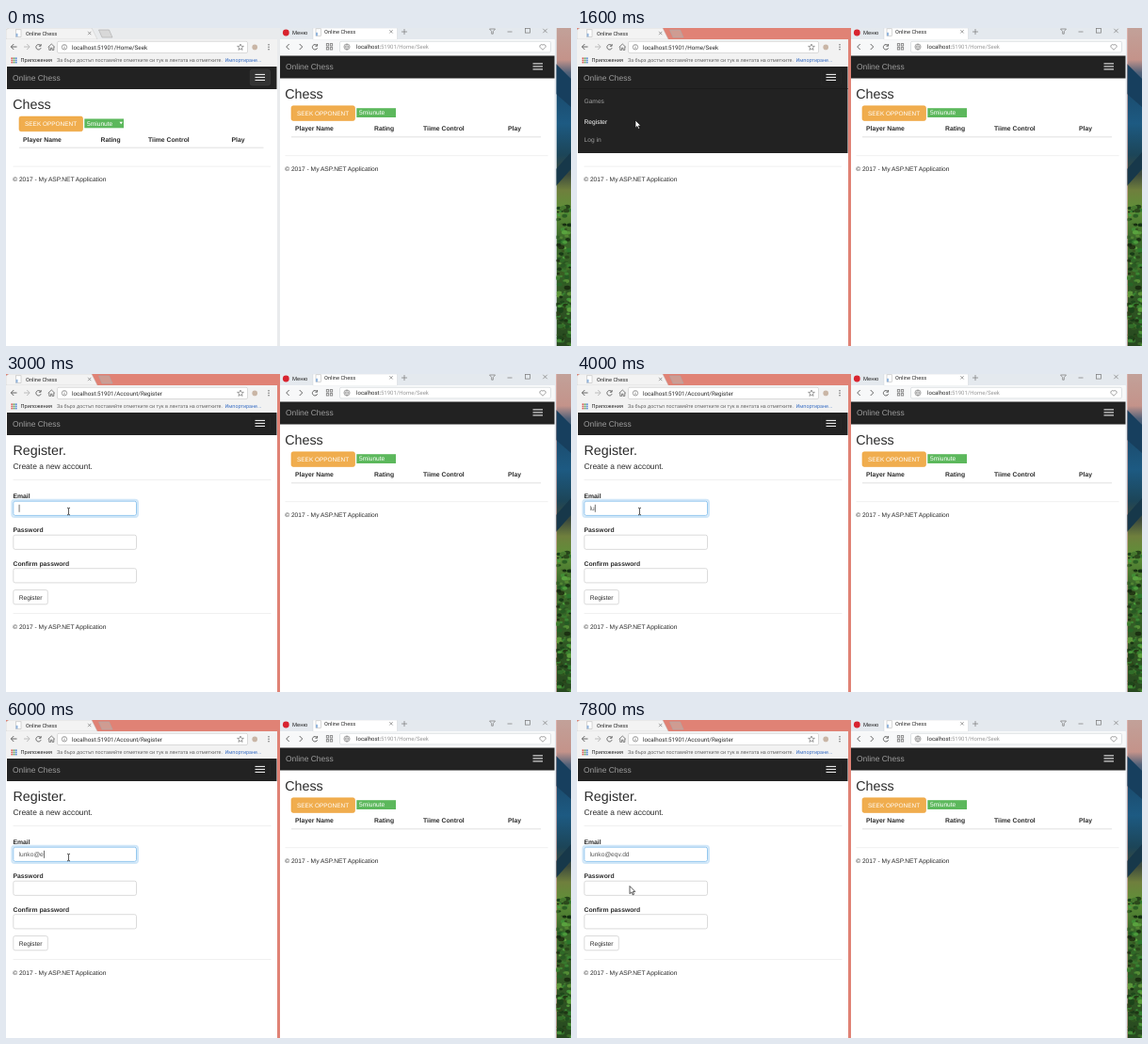
Animation, 600 px wide and 338 px high, one loop 8 s. Source, as an HTML page:

```html
<!DOCTYPE html>
<html lang="en">
<head>
<meta charset="utf-8">
<title>Online Chess</title>
<style>
  html, body { margin: 0; width: 100%; height: 100%; overflow: hidden; background: #fff; }
  svg { display: block; width: 100%; height: 100%; }
  text { font: 6.65px "Liberation Sans", Arial, sans-serif; fill: #2b2b2b; text-rendering: geometricPrecision; white-space: pre; }
  .ui { font-family: Roboto, "Open Sans", sans-serif; font-size: 5.4px; }
  .tab { font-size: 5.7px; }
  .url { font-size: 6.25px; }
  .bold { font-weight: bold; font-size: 6.8px; }
  .h2 { font-size: 14.3px; }
  .h4 { font-size: 8.45px; }
  .nav { fill: #9d9d9d; }
  .white { fill: #fff; }
  .line { fill: none; stroke: #666; stroke-width: 1; }
  .thin { fill: none; stroke: #777; stroke-width: .7; }
</style>
</head>
<body>
<script>
const LOOP = 8000, STEP = 200;
const EMAIL = "lunko@eqv.dd";
const KEY_TIMES = [3800, 4000, 4400, 4800, 5200, 5600, 6000, 6200, 6400, 6800, 7000, 7200];
const POINTER_PATH = [[800, 270, 54], [1400, 62, 98], [2600, 62, 98], [3000, 66.5, 146], [7200, 66.5, 146], [7800, 56, 176.5]];

const rect = (x, y, w, h, fill, extra = "") =>
  `<rect x="${x}" y="${y}" width="${w}" height="${h}" fill="${fill}" ${extra}/>`;
const text = (x, y, content, cls = "", extra = "") =>
  `<text x="${x}" y="${y}" class="${cls}" ${extra}>${content}</text>`;
const path = (d, cls = "line", extra = "") => `<path d="${d}" class="${cls}" ${extra}/>`;
const circle = (x, y, r, fill, extra = "") => `<circle cx="${x}" cy="${y}" r="${r}" fill="${fill}" ${extra}/>`;
const cross = (x, y, r) => path(`M${x - r} ${y - r}l${2 * r} ${2 * r}m0 ${-2 * r}l${-2 * r} ${2 * r}`, "thin");
const reload = (x, y) => path(`M${x + 2.2} ${y - 1.6}a2.7 2.7 0 1 0 .4 2.6M${x + 2.6} ${y - 3.2}v2.2h-2.2`);
const favicon = (x, y) =>
  rect(x, y, 5.5, 7.5, "#fff", 'stroke="#bbb" stroke-width=".6"') + rect(x, y + 4, 2, 3.5, "#93b5dc");
const rule = (x, y, w) => rect(x, y, w, .6, "#e6e6e6");
const footer = (x, y) => text(x, y, "© 2017 - My ASP.NET Application");

function navbar(x, y, w, button = "") {
  const bars = [0, 3, 6].map(dy => rect(x + w - 23, y + 7.9 + dy, 10.5, 1, "#fff")).join("");
  return rect(x, y, w, 24, "#222") + text(x + 6, y + 14.5, "Online Chess", "h4 nav") + button + bars;
}

// The lobby page; y is the bottom edge of its navigation bar.
function lobby(x, y, w, columns, arrow = "") {
  const names = ["Player Name", "Rating", "Tiime Control", "Play"];
  return text(x + 7.2, y + 21.8, "Chess", "h2")
    + rect(x + 14, y + 29.6, 67.5, 15.6, "#f0ad4e", 'rx="2" stroke="#eea236" stroke-width=".6"')
    + text(x + 20, y + 39.8, "SEEK OPPONENT", "white", 'style="font-size:6.45px"')
    + rect(x + 83.3, y + 32, 41.7, 9.8, "#5cb85c")
    + text(x + 86, y + 39.2, "5miunute", "white") + arrow
    + names.map((name, i) => text(columns[i], y + 56, name, "bold")).join("")
    + rect(x + 14, y + 62.2, w - 28, .9, "#ddd")
    + rule(x + 7.5, y + 82.3, w - 14) + footer(x + 7.2, y + 98.7);
}

const field = (label, y, id = "") => text(7.5, y, label, "bold")
  + rect(7.8, y + 3.2, 130.7, 15.2, "#fff", `id="${id}" rx="2" stroke="#ccc" stroke-width=".7"`);

const registerPage = text(7.5, 86, "Register.", "h2") + text(7.5, 101, "Create a new account.", "h4")
  + rule(7.5, 112, 274)
  + rect(6.3, 133.7, 133.7, 18.2, "none", 'id="glow" rx="3" stroke="#66afe9" stroke-opacity=".3" stroke-width="2"')
  + field("Email", 132, "emailBox") + field("Password", 168) + field("Confirm password", 203.5)
  + text(13.5, 145.2, "", "", 'id="email" style="fill:#555"') + rect(0, 138.8, .7, 8, "#333", 'id="caret"')
  + rect(7.8, 229.5, 36.5, 15.3, "#fff", 'rx="2" stroke="#ccc" stroke-width=".7"') + text(13.7, 239.6, "Register")
  + rule(7.5, 254.4, 274) + footer(7.2, 271);

const leftChrome = path("M0 12V2L3 0H91L97 12Z", "", 'fill="#f3f3f3" stroke="#bbb" stroke-width=".4"')
  + favicon(10.5, 1.8) + text(21, 7.7, "Online Chess", "ui tab") + cross(88.7, 5.5, 1.7)
  + path("M98.5 2H109.5L113 10H102Z", "", 'id="newTab" stroke="#aaa" stroke-width=".6"')
  + rect(0, 12, 288, 29, "#f2f2f2")
  + path("M11.5 20H5.5M8.3 17l-3 3 3 3") + path("M19 20h6M22.2 17l3 3-3 3", "line", 'style="stroke:#bbb"') + reload(34.5, 20.2)
  + path("M44.7 20.4l3.6-3.4l3.6 3.4M45.8 19.8v3.6h1.8v-2.2h1.4v2.2h1.8v-3.6", "line", 'style="stroke-width:.8"')
  + rect(54.5, 14.3, 202, 12.2, "#fff", 'rx="1.5" stroke="#c4c4c4" stroke-width=".6"')
  + circle(62, 20.3, 2.7, "none", 'stroke="#777" stroke-width=".7"') + path("M62 19.8v2.2M62 18.4v.7", "thin")
  + text(70, 22.5, "", "ui url", 'id="address"')
  + path("M249 17l.9 2.3 2.5.1-2 1.6.7 2.4-2.1-1.4-2.1 1.4.7-2.4-2-1.6 2.5-.1Z", "thin")
  + circle(264.2, 20.4, 2.8, "#c9b5a5")
  + [17.8, 20.3, 22.8].map(y => circle(279, y, .75, "#666")).join("")
  + ["#d9534f", "#5a9a55", "#4a7fd0"].map((c, i) => [31.4, 33.6, 35.8].map(y => rect(5.5 + 2.2 * i, y, 1.6, 1.6, c)).join("")).join("")
  + text(15.5, 36, "Приложения", "ui", 'style="font-size:5.6px"')
  + text(54, 36, "За бърз достъп поставяйте отметките си тук в лентата на отметките.", "ui", 'style="fill:#666"')
  + text(232.5, 36, "Импортиране...", "ui", 'style="fill:#3a6fc4"');

const rightChrome = rect(291, 0, 293.5, 338, "#e4e9ee") + rect(291, 12, 291.5, 326, "#fff")
  + circle(297.3, 5, 3.4, "#d8232f") + text(304, 7, "Меню", "ui", 'style="font-size:5.8px"')
  + rect(326, 0, 89.5, 12.5, "#fff", 'stroke="#c9ced2" stroke-width=".4"')
  + favicon(329, .8) + text(338, 6, "Online Chess", "ui tab") + cross(409, 3.8, 1.7)
  + path("M423 1v6M420 4h6", "thin")
  + path("M513.5 1h6l-2.2 2.6v2.6h-1.6V3.6Z", "thin") + path("M532.5 4h5", "thin")
  + rect(551.5, .5, 5, 4.6, "none", 'stroke="#777" stroke-width=".7"') + cross(572.5, 3, 2.2)
  + rect(291, 12.3, 291.5, 17, "#f7f8f9")
  + path("M300.7 17l-3 3 3 3M311.7 17l3 3-3 3") + reload(328, 20.2)
  + [0, 4].map(dx => [0, 4].map(dy => rect(340.3 + dx, 16.6 + dy, 2.4, 2.4, "none", 'stroke="#777" stroke-width=".8"')).join("")).join("")
  + rect(354.5, 14.3, 224, 11.6, "#fff", 'rx="1.5" stroke="#ccd0d4" stroke-width=".6"')
  + circle(362, 20, 3.1, "none", 'stroke="#888" stroke-width=".7"')
  + path("M362 17v6.2M359 20h6M362 17q-3.2 3.1 0 6.2q3.2-3.1 0-6.2", "thin", 'style="stroke-width:.45"')
  + text(372, 22.2, 'localhost:<tspan fill="#999">51901/Home/Seek</tspan>', "ui", 'style="font-size:6px"')
  + path("M570 23.3l-3-3a1.9 1.9 0 0 1 3-2.2a1.9 1.9 0 0 1 3 2.2Z", "thin");

// A strip of desktop: pink sky, blue ridges, then meadow with leafy texture.
let seed = 7;
const random = () => (seed = seed * 16807 % 2147483647) / 2147483647;
const leaves = Array.from({ length: 150 }, () => {
  const y = 190 + 148 * random(), size = 1 + 2.5 * random();
  const color = `hsl(${95 + 25 * random()} 45% ${12 + 32 * random()}%)`;
  return `<ellipse cx="${585 + 15 * random()}" cy="${y}" rx="${size}" ry="${size * .7}" fill="${color}"/>`;
}).join("");
const wallpaperStops = [[0, "#c2a199"], [.1, "#c4938a"], [.14, "#54637a"], [.19, "#1b4a6b"], [.3, "#1d5a82"],
  [.4, "#1c4558"], [.46, "#3d4a3c"], [.51, "#6f7f3d"], [.57, "#5f9038"], [.66, "#3b6a2a"], [1, "#27481f"]];
const wallpaper = `<linearGradient id="hills" x2="0" y2="1">`
  + wallpaperStops.map(([at, color]) => `<stop offset="${at}" stop-color="${color}"/>`).join("")
  + `</linearGradient><clipPath id="desktop">${rect(584.5, 0, 15.5, 338, "#000")}</clipPath>`
  + `<g clip-path="url(#desktop)">${rect(584.5, 0, 15.5, 338, "url(#hills)")}`
  + path("M584 38L600 54V84L584 70Z", "", 'fill="#173f5e"')
  + path("M584 150L600 132V150L584 168Z", "", 'fill="#17384a"') + leaves + "</g>";

const toggler = rect(259.3, 44.3, 21.2, 16.6, "#333", 'id="toggler" rx="2" stroke-width=".8"');
const menu = `<clipPath id="reveal">${rect(0, 64, 288, 0, "#000", 'id="revealBox"')}</clipPath>
  <g clip-path="url(#reveal)">${rect(1, 64, 286.5, 69, "#222")}${rect(1, 64.5, 286.5, .5, "#151515")}
  ${text(7.5, 80.2, "Games", "nav")}${text(7.5, 102.2, "Register", "nav", 'id="registerLink"')}${text(7.5, 121.2, "Log in", "nav")}</g>`;

const pointer = `<g id="pointer">
  ${path("M0 0V8.2L1.9 6.4L3.2 9.3L4.6 8.7L3.3 5.9H5.8Z", "", 'id="arrow" fill="#fff" stroke="#111" stroke-width=".7"')}
  ${path("M-1.5-3.8Q0-3.8 0-2.8Q0-3.8 1.5-3.8M0-3V3M-1.5 3.8Q0 3.8 0 2.8Q0 3.8 1.5 3.8", "", 'id="beam" fill="none" stroke="#333" stroke-width=".8"')}</g>`;

document.body.innerHTML = `<svg viewBox="0 0 600 338" preserveAspectRatio="none">
  ${rect(0, 0, 600, 338, "#e08275", 'id="frame"')}${rect(0, 12, 288, 326, "#fff")}
  ${leftChrome}
  <g id="lobbyPage">${lobby(0, 64.5, 287.5, [18, 100.5, 151, 239.5], path("M120.5 99.7h3.4l-1.7 2.6Z", "", 'fill="#fff"'))}</g>
  <g id="registerPage">${registerPage}</g>
  ${navbar(1, 41, 286.5, toggler)}${menu}
  ${rightChrome}${navbar(291, 29.5, 291.5)}
  ${lobby(289, 53.2, 293, [307, 391, 443, 533])}
  ${wallpaper}${pointer}</svg>`;

const el = Object.fromEntries([...document.querySelectorAll("[id]")].map(node => [node.id, node]));
const show = (node, visible) => node.setAttribute("display", visible ? "inline" : "none");
const clamp = v => Math.min(1, Math.max(0, v));

function pointerAt(t) {
  const next = POINTER_PATH.findIndex(point => point[0] > t);
  if (next < 0) return POINTER_PATH.at(-1).slice(1);
  const [t0, x0, y0] = POINTER_PATH[Math.max(0, next - 1)];
  const [t1, x1, y1] = POINTER_PATH[next];
  const k = t1 > t0 ? clamp((t - t0) / (t1 - t0)) : 0;
  const eased = k * k * (3 - 2 * k);
  return [x0 + (x1 - x0) * eased, y0 + (y1 - y0) * eased];
}

function render(time) {
  const t = Math.floor(time % LOOP / STEP) * STEP;
  const active = t >= 200, registering = t >= 1800, focused = t >= 3000;

  el.frame.setAttribute("fill", active ? "#e08275" : "#e9ebed");
  el.newTab.setAttribute("fill", active ? "#cf9c92" : "#d8d8d8");
  el.address.textContent = "localhost:51901/" + (registering ? "Account/Register" : "Home/Seek");
  show(el.lobbyPage, !registering);
  show(el.registerPage, registering);

  el.toggler.setAttribute("fill", t < 1000 ? "#333" : "#222");
  el.toggler.setAttribute("stroke", active && t < 1400 ? "#3f78a8" : t < 1000 ? "#3a3a3a" : "#272727");
  el.revealBox.setAttribute("height", registering ? 0 : 69 * clamp((t - 368) / 400));
  el.registerLink.style.fill = t >= 1400 ? "#fff" : "";

  const typed = KEY_TIMES.filter(at => at <= t);
  const sinceKey = t - (typed.at(-1) ?? 3000);
  el.email.textContent = EMAIL.slice(0, typed.length);
  el.emailBox.setAttribute("stroke", focused ? "#66afe9" : "#ccc");
  show(el.glow, focused);
  show(el.caret, focused && sinceKey % 800 < 400);
  el.caret.setAttribute("x", 13.7 + (typed.length ? el.email.getComputedTextLength() : 0));

  const beam = focused && t < 7400;
  show(el.pointer, t >= 800);
  show(el.beam, beam);
  show(el.arrow, !beam);
  el.pointer.setAttribute("transform", `translate(${pointerAt(t)})`);
}

const start = performance.now();
function tick() {
  render(performance.now() - start);
  requestAnimationFrame(tick);
}
tick();
</script>
</body>
</html>
```
